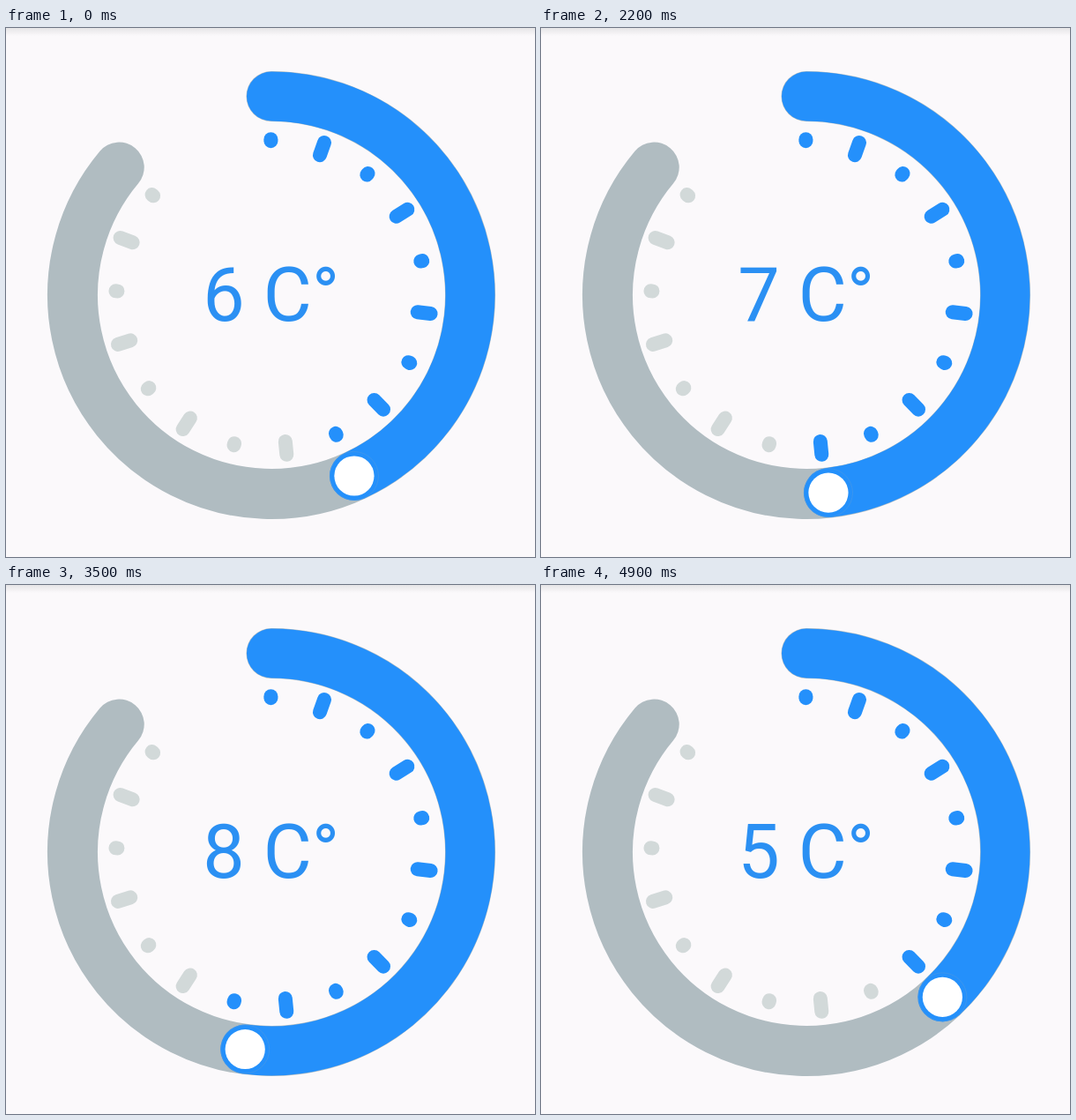
An HTML page that plays this animation: 600x600 px, repeating every 5000 ms.

```html
<!DOCTYPE html>
<html lang="en">
<head>
<meta charset="utf-8">
<title>Temperature dial</title>
<style>
  html, body { margin: 0; width: 100%; height: 100%; overflow: hidden; background: #fbf9fb; }
  svg { display: block; width: 100%; height: 100%; }
  path, line { fill: none; stroke-linecap: round; }
  text { font: 400 84.5px Roboto, sans-serif; text-anchor: middle; fill: #2b90f3; }
  #dial { filter: blur(.6px); }
</style>
</head>
<body>
<svg viewBox="0 0 600 600">
  <defs>
    <linearGradient id="shade" x1="0" y1="0" x2="0" y2="1">
      <stop offset="0" stop-color="#e6e5e7"/>
      <stop offset="1" stop-color="#fbf9fb"/>
    </linearGradient>
  </defs>
  <rect width="600" height="600" fill="#fbf9fb"/>
  <rect width="600" height="9" fill="url(#shade)"/>
  <g id="dial">
    <path id="track" stroke="#b0bcc1" stroke-width="57"/>
    <path id="fill" stroke="#2490fb" stroke-width="56"/>
    <g id="ticks"></g>
    <g id="thumb">
      <circle r="27.5" fill="#2490fb" stroke="#5a9bdc" stroke-opacity=".45"/>
      <circle r="22.6" fill="#fff"/>
    </g>
    <text id="label" x="300.8" y="331.5"></text>
  </g>
</svg>
<script>
const LOOP = 5000, SWEEP = 310, STEPS = 16, STEP = SWEEP / STEPS;
const CX = 301, CY = 303, R = 225.5;
const BLUE = '#2490fb', PALE = '#d2d9d9';
const FIRST = 155.4, LOW = 150.2, HIGH = 198, LAST = 136.8;

const $ = id => document.getElementById(id);
const progress = (t, from, to) => Math.min(1, Math.max(0, (t - from) / (to - from)));
const easeIn = (u, power) => u ** power;
const easeOut = (u, power) => 1 - (1 - u) ** power;

// Settle back a little, rise slowly, then fall faster
function angleAt(t) {
  return FIRST
    + (LOW - FIRST) * easeOut(progress(t, 0, 400), 1.5)
    + (HIGH - LOW) * easeIn(progress(t, 900, 3200), 1.25)
    + (LAST - HIGH) * easeOut(progress(t, 3250, 4900), 1.13);
}

function polar(deg, r = R, cx = CX, cy = CY) {
  const a = deg * Math.PI / 180;
  return [cx + r * Math.sin(a), cy - r * Math.cos(a)];
}

function arc(deg) {
  return `M${polar(0)}A${R} ${R} 0 ${deg > 180 ? 1 : 0} 1 ${polar(deg)}`;
}

const ticks = Array.from({ length: STEPS + 1 }, (_, i) => {
  const line = document.createElementNS('http://www.w3.org/2000/svg', 'line');
  const half = i % 2 ? 7.5 : 1;
  const [x1, y1] = polar(i * STEP, 175 - half, 300.4, 302.2);
  const [x2, y2] = polar(i * STEP, 175 + half, 300.4, 302.2);
  const attrs = { x1, y1, x2, y2, 'stroke-width': 16 };
  for (const k in attrs) line.setAttribute(k, attrs[k]);
  return $('ticks').appendChild(line);
});

function draw(t) {
  const deg = angleAt(t), level = Math.round(deg / STEP);
  $('fill').setAttribute('d', arc(deg));
  $('thumb').setAttribute('transform', `translate(${polar(deg)})`);
  ticks.forEach((line, i) => line.setAttribute('stroke', i <= level ? BLUE : PALE));
  $('label').textContent = `${level - 2} C°`;
}

$('track').setAttribute('d', arc(SWEEP));
const start = performance.now();
function tick() {
  draw((performance.now() - start) % LOOP);
  requestAnimationFrame(tick);
}
tick();
</script>
</body>
</html>
```
